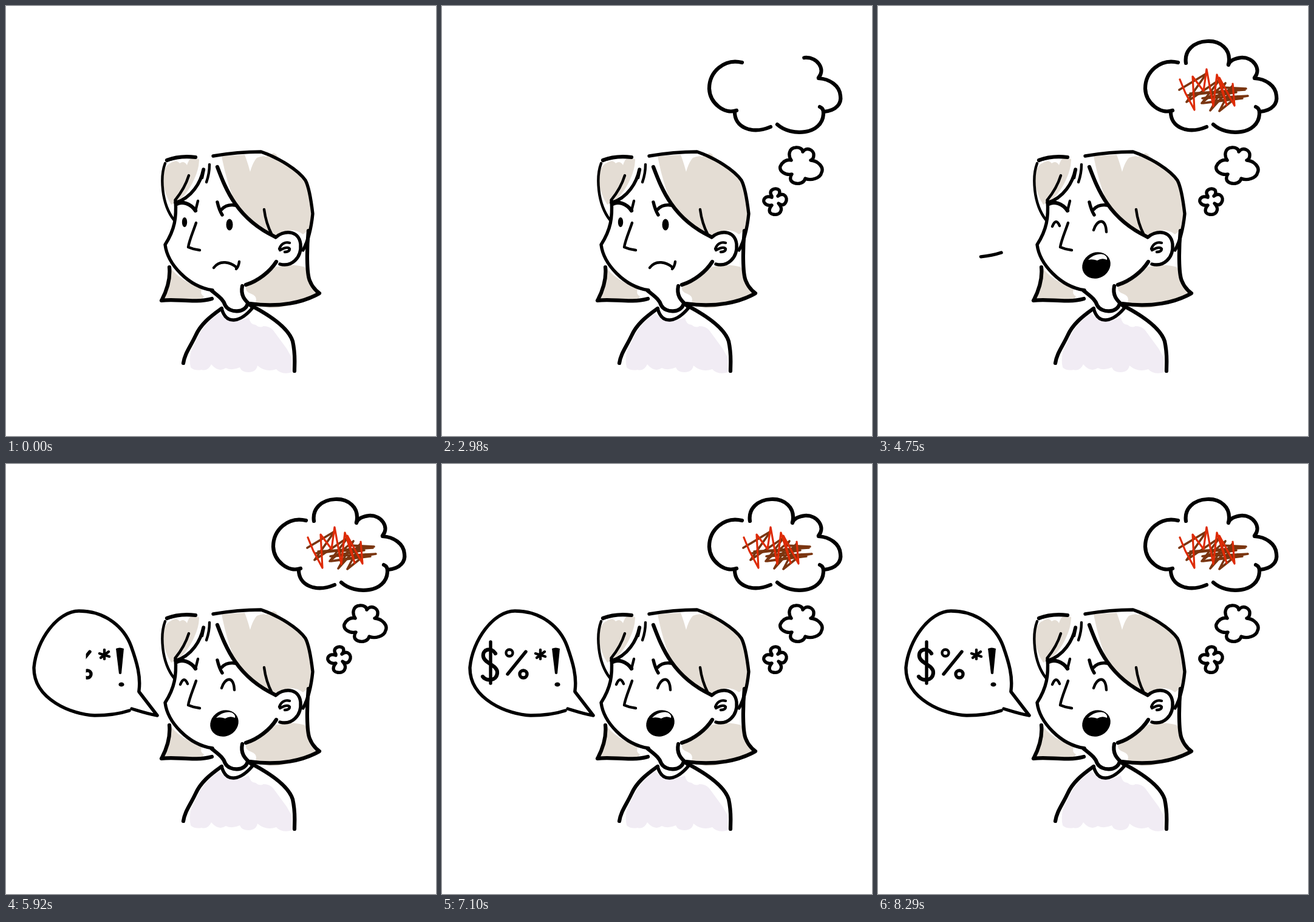
Recreate the animation shown at these times as an HTML page. Size 708x708 px, loop 8.87 s.

```html
<!DOCTYPE html>
<html lang="en">
<head>
<meta charset="utf-8">
<title>Angry thought</title>
<style>
  html, body { margin: 0; width: 100%; height: 100%; overflow: hidden; background: #fff; }
  svg { display: block; width: 100vw; height: 100vh; }
  .ink { fill: none; stroke: #000; stroke-width: 6.2; stroke-linecap: round; stroke-linejoin: round; }
  .thick { stroke-width: 7; }
  .thin { stroke-width: 5.4; }
  .fine { stroke-width: 4.4; }
  .hair { fill: #e4ddd4; }
  .shirt { fill: #f1ecf4; }
  .solid { fill: #000; }
  .brown { stroke: #7a3510; stroke-width: 3.6; }
  .red { stroke: #de2b06; stroke-width: 3.2; }
</style>
</head>
<body>
<svg viewBox="0 0 708 708">
  <clipPath id="wipe"><rect id="wipeBox" x="198" y="280" width="150" height="100"/></clipPath>

  <g class="hair">
    <path d="M355 247L393 245Q398 258 402 273Q406 258 413 250Q422 246 428 248L440 242Q446 243 448 250Q484 270 495 292Q505 318 504 345L499 368L489 376Q476 366 460 371L443 380Q402 358 375 318Q362 285 355 247Z"/>
    <path d="M260 272Q264 261 272 258Q280 252 286 259Q293 254 298 262Q301 252 306 250L318 252Q318 268 310 285Q298 312 280 323L272 327Q262 312 258 290Z"/>
    <path d="M270 430Q282 446 300 455L323 465Q318 474 326 478L322 484Q290 482 261 481Q270 455 270 430Z"/>
    <path d="M396 460Q424 452 443 430Q470 423 492 430L497 438Q499 460 515 473Q492 488 448 497Q422 498 410 490Q416 479 404 474Q392 470 396 460Z"/>
  </g>
  <path class="shirt" d="M350 506Q360 514 366 517Q380 521 400 513Q402 525 411 525Q418 531 424 527Q434 527 440 534L462 564L471 580V603Q454 608 445 598Q428 604 414 592Q412 603 399 603Q388 603 385 595Q372 601 362 596Q350 604 338 590Q332 602 322 599Q310 601 304 595Q300 575 308 562Q318 535 335 518Z"/>

  <g class="ink">
    <path d="M265 254Q285 246 312 249"/>
    <path class="fine" d="M262 259C254 280 255 325 277 353"/>
    <path class="thin" d="M325 269C321 290 306 316 279 324"/>
    <path class="fine" d="M301 279C296 295 288 308 279 319M326 269L323 283M335 261Q335 276 330 290"/>
    <path class="thin" d="M341 247C370 242 395 240 420 240C450 250 482 271 493 287C500 300 503 325 505 342C503 362 498 386 489 402"/>
    <path d="M498 370C495 400 495 440 500 452Q505 465 516 473C490 488 450 497 402 490"/>
    <path d="M348 265C362 302 380 350 443 380"/>
    <path class="fine" d="M425 335Q428 358 438 377"/>
    <path class="thin" d="M279 320C281 348 278 368 262 393C266 425 300 462 340 468"/>
    <path d="M269 430C271 450 264 470 256 485C280 481 310 490 339 482"/>
    <path d="M395 459C415 453 435 437 445 421"/>
    <path d="M389 461C386 476 392 484 404 494"/>
    <path d="M338 468C350 478 358 483 361 493C368 506 394 506 398 490"/>
    <path class="thin" d="M355 498C362 525 385 522 406 497"/>
    <path d="M355 498C335 512 320 525 312 543C303 562 294 573 292 588"/>
    <path d="M407 495C435 510 465 530 472 552C477 575 475 585 475 601"/>
    <path class="thin" d="M444 381C455 370 482 367 485 392C487 415 470 430 451 425"/>
    <path class="fine" d="M450 400C453 391 460 388 467 390M451 402Q464 395 467 400Q467 405 459 405"/>
    <path d="M281 326C290 321 304 325 312 337"/>
    <path class="fine" d="M316 321L312 337"/>
    <path class="thin" d="M348 323Q351 336 356 344M355 335Q363 326 377 328"/>
    <path class="fine" d="M313 357C308 372 302 385 300 397Q309 401 319 402"/>
  </g>

  <g id="sulk">
    <ellipse class="solid" cx="294" cy="356" rx="4.2" ry="8"/>
    <ellipse class="solid" cx="368" cy="360" rx="5.5" ry="9.5"/>
    <path class="ink fine" d="M342 431C352 417 370 422 379 430M384 421Q383 429 379 433"/>
  </g>
  <g id="shout">
    <path class="ink fine" d="M287 363Q293 348 299 362M355 369C360 352 375 347 376 372"/>
    <ellipse class="solid" cx="359.5" cy="427" rx="24" ry="21" transform="rotate(-30 359.5 427)"/>
    <path fill="#fff" d="M346 418C353 410 366 406 373 410Q378 413 377 418Q369 414 361 419Q353 416 346 418Z"/>
  </g>

  <!-- data-t: start and end of each pen stroke in ms -->
  <g class="ink">
    <path class="thin" data-t="1420 1800" d="M543 313C536 303 549 298 555 303C557 307 556 310 553 313C563 306 570 315 566 323C563 329 558 328 554 325C564 336 556 345 545 343C537 341 538 334 543 328C533 330 527 322 531 317Q535 312 543 315"/>
    <path class="thin" data-t="1800 2250" d="M575 254C569 245 572 234 582 233C589 232 594 236 594 240C600 231 613 237 612 246Q612 252 607 254C620 255 629 266 625 274C623 284 607 288 598 284C596 292 586 294 579 291C572 288 573 281 576 277C565 279 555 272 557 264C560 257 567 252 575 254"/>
    <path data-t="2250 2465" d="M494 93C465 86 440 108 440 136C441 160 465 179 485 172"/>
    <path data-t="2465 2585" d="M482 173C481 200 510 212 541 199"/>
    <path data-t="2585 2740" d="M552 195C575 216 626 212 628 178Q629 169 622 166"/>
    <path data-t="2740 2890" d="M629 174C650 172 658 160 656 148C655 131 638 120 620 119"/>
    <path data-t="2890 3010" d="M620 118C632 104 618 84 598 85C588 86 580 90 577 96"/>
    <path data-t="3010 3190" d="M577 97C583 70 562 57 542 58C520 59 504 73 507 94"/>
    <path class="brown" data-t="3300 3750" d="M496 138L541 111L508 158L563 121L533 160L572 127L547 172L584 131L562 173L592 149"/>
    <path class="brown" data-t="3550 4000" d="M510 147L606 136L568 134L604 138L514 144L590 142L534 152L609 148L535 160L600 152"/>
    <path class="red" data-t="3750 4250" d="M497 121L506 143L521 171L518 116L536 140L541 104L552 165L558 113L574 163L562 118L587 164L584 128"/>
    <path class="thin" data-t="4703 5260" d="M203 406C188 411 168 414 146 414C110 413 45 388 46 335C50 290 85 242 120 242C165 242 195 270 206 300C216 328 222 350 219 373"/>
    <path class="thin" data-t="5260 5370" d="M219 375L249 414C235 412 220 407 207 403"/>
  </g>

  <g clip-path="url(#wipe)">
    <g class="ink">
      <path d="M88 312C81 301 66 305 68 317C70 329 92 331 91 344C90 358 72 358 67 350"/>
      <path class="thin" d="M80 293V361M138 309L108 346"/>
      <circle class="fine" cx="111" cy="311" r="5.5"/>
      <circle class="thin" cx="134" cy="346" r="6"/>
      <path class="fine" d="M162 306V321M154 312L170 317M169 309L156 319"/>
    </g>
    <path class="solid" d="M181 304Q187 301 194 304L190 345Q188 347 186 345Z"/>
    <ellipse class="solid" cx="190" cy="363" rx="4.6" ry="3.6"/>
  </g>
</svg>
<script>
  const LOOP = 8870, HOLD = 1500, STEP = 147.3, LAST = 46;
  const byId = id => document.getElementById(id);
  const show = (el, on) => el.style.visibility = on ? 'visible' : 'hidden';
  const progress = (t, a, b) => Math.min(1, Math.max(0, (t - a) / (b - a)));

  const strokes = [...document.querySelectorAll('[data-t]')].map(el => {
    const [start, end] = el.dataset.t.split(' ').map(Number);
    return { el, start, end, length: el.getTotalLength() };
  });

  // The picture moves in even steps after the opening hold.
  function stepped(t) {
    return t < HOLD ? 0 : HOLD + STEP * Math.min(LAST, Math.floor((t - HOLD) / STEP));
  }

  function draw(t) {
    for (const { el, start, end, length } of strokes) {
      const p = progress(t, start, end);
      show(el, p > 0);
      el.style.strokeDasharray = p < 1 ? `${p * length} ${length * 2}` : 'none';
    }
    const angry = t >= 4400;
    show(byId('sulk'), !angry);
    show(byId('shout'), angry);
    byId('wipeBox').setAttribute('x', 198 - 140 * progress(t, 5670, 6195));
  }

  const origin = performance.now();
  function tick() {
    draw(stepped((performance.now() - origin) % LOOP));
    requestAnimationFrame(tick);
  }
  tick();
</script>
</body>
</html>
```
